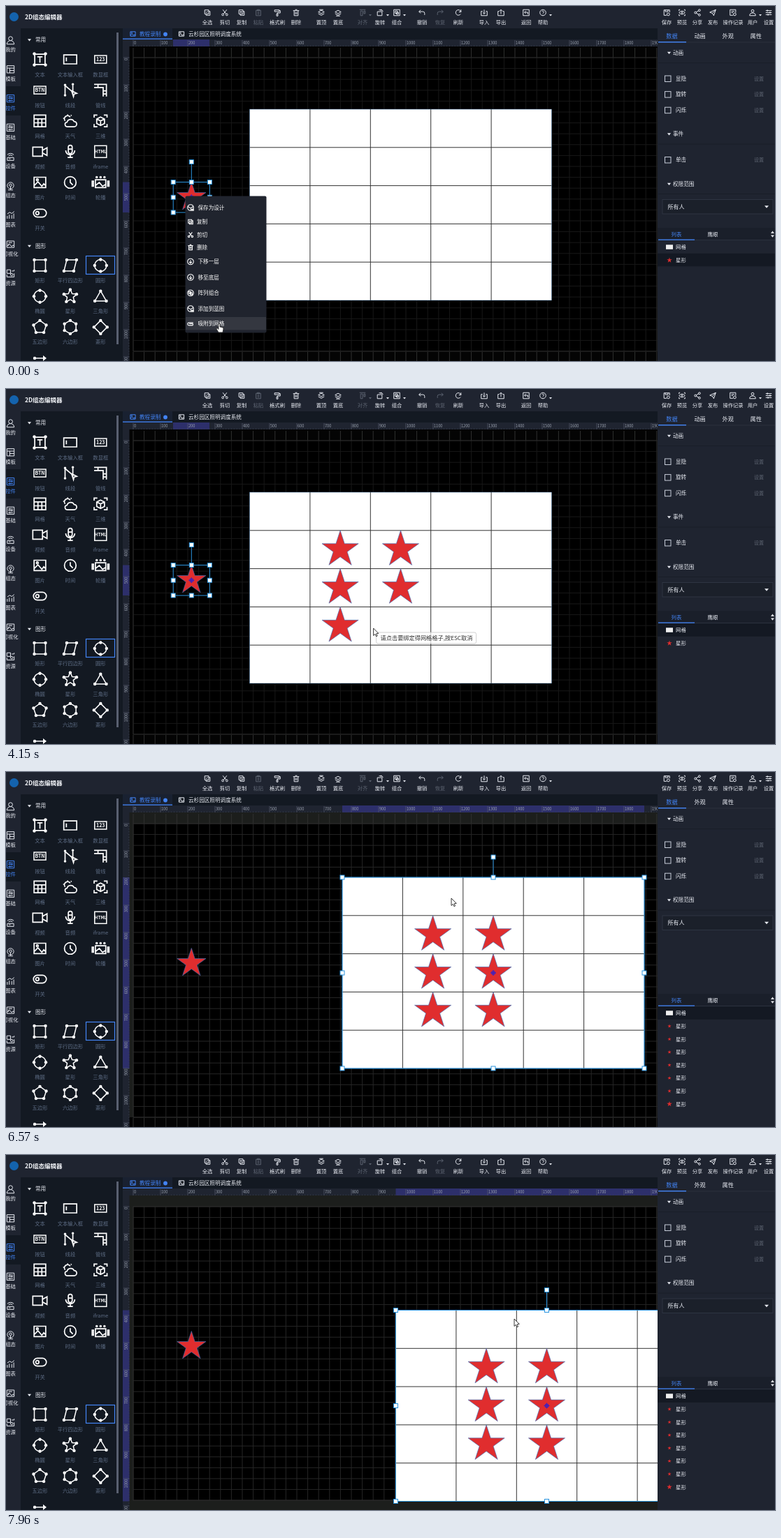
Recreate the animation shown at these times as an HTML page with a canvas. Size 1100 by 509 pixels, loop 8 s.

```html
<!DOCTYPE html>
<html lang="zh-CN">
<head>
<meta charset="utf-8">
<title>2D组态编辑器</title>
<style>
html, body { margin: 0; width: 100%; height: 100%; overflow: hidden; background: #131922; }
canvas { display: block; width: 1100px; height: 509px; }
</style>
</head>
<body>
<canvas id="stage" width="1100" height="509"></canvas>
<script>
const c = document.getElementById('stage').getContext('2d');
const LOOP = 8000;
const FONT = '"Noto Sans CJK SC", "Noto Sans CJK", "Noto Sans", sans-serif';
const BAR = '#1f2430', DARK = '#131922', INK = '#e8ebf2', DIM = '#5c6370', BLUE = '#4384f5', RED = '#e02d2e', SEL = '#2d2f6b';

// Bursts of screen updates: first, last, count
const BURSTS = [[400, 1370, 8], [1490, 2480, 8], [2600, 3600, 8], [3750, 4290, 5],
  [4790, 5090, 3], [5520, 6450, 8], [6570, 7540, 8], [7690, 7960, 3]];
// Pointer path: time, x, y
const POINTER = [[0, 305, 456], [400, 308, 452], [680, 345, 405], [1090, 440, 282], [1370, 478, 238], [1630, 486, 231],
  [1770, 500, 232], [2060, 566, 235], [2340, 574, 240], [2600, 570, 282], [2740, 562, 290], [3030, 491, 290],
  [3310, 486, 325], [3600, 486, 343], [3890, 510, 344], [4290, 558, 341], [4940, 556, 340], [5090, 557, 341],
  [5520, 562, 320], [5650, 548, 285], [5790, 512, 205], [5920, 497, 181], [6570, 637, 181], [6850, 675, 182],
  [7130, 622, 182], [7400, 525, 180], [7540, 512, 195], [7690, 560, 250], [7820, 650, 265], [7960, 727, 235]];
// Table position: time, x, y
const TABLE = [[0, 348.5, 148], [5920, 348.5, 148], [6050, 365, 151], [6570, 481, 151], [6850, 526, 151], [7130, 484, 151],
  [7400, 396.5, 151], [7540, 376, 160], [7690, 400, 205], [7820, 480, 236], [7960, 557.5, 222.5]];
// Bound stars: time, column, row
const BOUND = [[1490, 1, 1], [2200, 2, 1], [2740, 2, 2], [3030, 1, 2], [3600, 1, 3], [4290, 2, 3]];
const CW = 86.4, CH = 54.8;

function held(t) {
  let now = 0;
  for (const [a, b, n] of BURSTS)
    for (let i = 0; i < n; i++) {
      const s = Math.round((a + (b - a) * i / (n - 1)) / 10) * 10;
      if (t >= s) now = s;
    }
  return now;
}
function along(path, t) {
  let i = path.findIndex(k => k[0] > t);
  if (i < 0) return path[path.length - 1].slice(1);
  const p = path[i - 1], q = path[i], f = (t - p[0]) / (q[0] - p[0]);
  return [p[1] + (q[1] - p[1]) * f, p[2] + (q[2] - p[2]) * f];
}

function box(x, y, w, h, fill) { c.fillStyle = fill; c.fillRect(x, y, w, h); }
function frame(x, y, w, h, color, lw = 1) { c.strokeStyle = color; c.lineWidth = lw; c.strokeRect(x, y, w, h); }
function line(x1, y1, x2, y2, color, lw = 1) {
  c.strokeStyle = color; c.lineWidth = lw;
  c.beginPath(); c.moveTo(x1, y1); c.lineTo(x2, y2); c.stroke();
}
function text(s, x, y, size = 7.4, color = INK, align = 'left', weight = 400) {
  c.font = `${weight} ${size}px ${FONT}`;
  c.textAlign = align; c.textBaseline = 'middle'; c.fillStyle = color;
  c.fillText(s, x, y);
}
const mid = (s, x, y, size, color, weight) => text(s, x, y, size, color, 'center', weight);
function poly(pts) {
  c.beginPath();
  pts.forEach(p => c.lineTo(p[0], p[1]));
  c.closePath();
}
function ring(n, r, x, y, inner) {
  const m = inner ? n * 2 : n;
  return Array.from({ length: m }, (_, i) => {
    const a = i / m * Math.PI * 2 - Math.PI / 2, k = inner && i % 2 ? inner : r;
    return [x + k * Math.cos(a), y + k * Math.sin(a)];
  });
}
function star(x, y, r, outline) {
  poly(ring(5, r, x, y, r * 0.382));
  c.fillStyle = RED; c.fill();
  if (outline) { c.strokeStyle = '#3f6fb5'; c.lineWidth = 0.65; c.stroke(); }
}
function arrow(x, y, color = INK, s = 2.6) {
  poly([[x - s, y - s / 2], [x + s, y - s / 2], [x, y + s / 2 + 0.6]]);
  c.fillStyle = color; c.fill();
}

const disc = (r, x = 0, y = 0) => `M${x - r} ${y}a${r} ${r} 0 1 0 ${2 * r} 0a${r} ${r} 0 1 0 ${-2 * r} 0`;
const COPY = 'M-8-8H4V4H-8ZM-4 4V8H8V-4H4', LAYER = 'M0-7L9-2 0 3-9-2ZM-9 3L0 8 9 3', TRAY = 'M-5-4H-9V9H9V-4H5M0-9V4', PIC = 'M-9-8H9V8H-9ZM-9 5L-3-1 3 6 6 2 9 5';
const ICON = {
  全选: COPY + 'M-5-2l2 2 4-4', 复制: COPY + 'M-5-2H1M-2-5V1',
  剪切: 'M-6-9L4 4M6-9L-4 4' + disc(3, -6, 6) + disc(3, 6, 6),
  粘贴: 'M-7-7H7V9H-7ZM-3-9H3V-5H-3ZM-3 0H3M-3 4H3', 格式刷: 'M-8-8H6V-3H-8ZM6-6H9V1H0V4M-2 4H2V10H-2Z',
  删除: 'M-9-6H9M-6-6V9H6V-6M-3-9H3M-2-2V5M2-2V5', 置顶: LAYER + 'M-6-9H6', 置底: LAYER + 'M-6 10H6',
  对齐: 'M-9-9H9M-6-5H0V9H-6ZM4-5H8V3H4Z', 旋转: 'M-8-3H6V9H-8ZM-3-8H6L9-3M3-10V-6', 组合: 'M-9-9H9V9H-9ZM-5-5H2V2H-5ZM-1-1H5V5H-1Z',
  撤销: 'M-4-8L-9-3-4 2M-9-3H3a5 5 0 0 1 5 5V7', 恢复: 'M4-8L9-3 4 2M9-3H-3a5 5 0 0 0-5 5V7', 刷新: 'M8-2A8 8 0 1 0 7 4M8-9V-2H2',
  导入: TRAY + 'M-4 0L0 4 4 0', 导出: TRAY + 'M-4-5L0-9 4-5', 返回: 'M-9-9H9V9H-9ZM-1-5L-5-1-1 3M-5-1H5V5',
  帮助: disc(9) + 'M-3-3a3 3 0 1 1 3 4V2M0 5V6', 保存: 'M9-1V-8H-8V8H0M-4-8V-3H4V-8' + disc(4, 5, 5),
  预览: 'M-6-9H-9V-5M6-9H9V-5M-9 5V9H-6M9 5V9H6M-9 0Q0-10 9 0Q0 10-9 0' + disc(2),
  分享: 'M-4-1L4-6M-4 1L4 6' + disc(3, -6) + disc(3, 6, -7) + disc(3, 6, 7), 发布: 'M-9-1L9-9 3 9-1 2ZM-1 2L9-9',
  操作记录: 'M-9-9H8V0M-9-9V8H0M-5-4H4M-5 0H0' + disc(4, 5, 5), 用户: disc(4, 0, -5) + 'M-9 9a9 8 0 0 1 18 0Z',
  设置: 'M-9-6H9M-9 0H9M-9 6H9M-4-9V-3M4-3V3M-2 3V9',
  我的: disc(5, 0, -4) + 'M-9 10a9 9 0 0 1 18 0Z', 模板: 'M-9-9H9V9H-9ZM-9-3H9M-2-3V9M-2 3H9',
  控件: 'M-9-9H9V9H-9ZM-6-4H6M-6 0H6M-6 5H6M-2-6V-2M3-2V2M-2 3V7',
  设备: 'M-8 2H8V9H-8ZM-4 5H0M-5-2a7 7 0 0 1 10 0M-8-5a11 11 0 0 1 16 0', 组态: disc(8, 0, -1) + disc(3, 0, -2) + 'M-6 10H6M0 2V9',
  图表: 'M-8 9V2M-3 9V-1M3 9V0M8 9V-4M-8-3L-2-7 3-4 9-9', 可视化: PIC + 'M-5-4H4M-5-1V4', 资源: 'M-9-9H0V0H-9ZM-9 3V9H9V0M3-6H9V-9' + disc(3, 3, 3),
  文本: 'M-8-8H8V8H-8ZM-4-4H4M0-4V5', 文本输入框: 'M-10-7H10V7H-10ZM-6-3V3',
  线段: 'M-8 8V-7L4 3V-9M2 1L10 5 6 6 5 10Z' + disc(1, -8, -8) + disc(1, -8, 8) + disc(1, 4, -9), 管线: 'M-10-9H9V10M-10-4H4V10M-4-9V-4M4 1H9M4 6H9',
  网格: 'M-9-9H9V9H-9ZM-9-3H9M-9 3H9M-3-3V9M3-3V9', 天气: 'M-4 9H6a4 4 0 0 0 0-8a6 6 0 0 0-11 1a3.5 3.5 0 0 0 1 7ZM-8 0a5 5 0 0 1 8-6M-11-4H-9M-4-10V-8M2-9L1-8',
  三维: 'M0-6L6-3V4L0 7-6 4V-3ZM-6-3L0 0 6-3M0 0V7M-10-5V-9H-5M5-9H10V-5M10 5V9H5M-5 9H-10V5',
  视频: 'M-11-7H4V7H-11ZM4-2L11-6V6L4 2', 音频: 'M-3-7a3 3 0 0 1 6 0V0a3 3 0 0 1-6 0ZM-7-2a7 7 0 0 0 14 0M0 6V9M-4 9H4M-3-4H3',
  图片: PIC + disc(1.5, -4, -4), 时间: disc(9) + 'M0-5V0L4 4', 轮播: 'M-8-4H8V8H-8ZM-8 5L-2 0 3 6 8 3M-13-2V6H-11V-2ZM13-2V6H11V-2Z' + disc(1, -6, -8) + disc(1, 0, -8) + disc(1, 6, -8),
  开关: 'M-4-6H4a6 6 0 0 1 0 12H-4a6 6 0 0 1 0-12Z' + disc(2.5, -4),
  下: disc(9) + 'M0-5V5M-4 1L0 5 4 1', 网: disc(9) + 'M-5-4H1V2H-5ZM-1-1H5V5H-1Z', 设计: disc(9) + 'M-8-3L0 2 8-3M1 5H9V9H1Z',
  夹: 'M8-3H-5a4 4 0 0 0 0 8H6a3 3 0 0 0 0-5H-4', 颜料: 'M-6-2L0-9 8 0 1 7ZM-4-4H5M-9 10H9', 缩放: 'M-9-4V-9H-4M4-9H9V-4M9 4V9H4M-4 9H-9V4M-4-4H4V4H-4Z',
  拉伸: 'M-9-9H9V9H-9ZM-5 5L5-5M1-5H5V-1M-5 1V5H-1'
};
ICON.基础 = ICON.控件;
const cache = {};
function icon(name, x, y, size, color = INK, lw = 1) {
  const p = cache[name] || (cache[name] = new Path2D(ICON[name]));
  c.save();
  c.translate(x, y); c.scale(size / 20, size / 20);
  c.strokeStyle = color; c.lineWidth = lw * 20 / size; c.stroke(p);
  c.restore();
}

const TOOLS = [['全选', 288], ['剪切', 313], ['复制', 337], ['粘贴', 361], ['格式刷', 388], ['删除', 415], ['置顶', 451], ['置底', 475],
  ['对齐', 510], ['旋转', 535], ['组合', 559], ['撤销', 595], ['恢复', 621], ['刷新', 647], ['导入', 684], ['导出', 708], ['返回', 744],
  ['帮助', 768], ['保存', 945], ['预览', 967], ['分享', 989], ['发布', 1011], ['操作记录', 1040], ['用户', 1068], ['设置', 1091]];
function header(mode) {
  box(0, 0, 1100, 32, BAR);
  c.beginPath(); c.arc(11.5, 15.5, 6.5, 0, 7); c.fillStyle = '#1463ad'; c.fill();
  text('2D组态编辑器', 27, 15.5, 8.5, '#f2f4f8', 'left', 700);
  TOOLS.forEach(([name, x], i) => {
    const off = ['粘贴', '对齐', '恢复'].includes(name) || (mode === 'page' && i > 0 && i < 11);
    const color = off ? DIM : INK;
    icon(name, x, 9.5, 9.5, color);
    mid(name, x, 23.5, 7.3, color);
    if (['对齐', '旋转', '组合', '帮助', '用户'].includes(name)) arrow(x + 11, 13, color, 2);
  });
}

const RAIL = ['我的', '模板', '控件', '基础', '设备', '组态', '图表', '可视化', '资源'];
const WIDGETS = ['文本', '文本输入框', '数显框', '按钮', '线段', '管线', '网格', '天气', '三维', '视频', '音频', 'iframe', '图片', '时间', '轮播', '开关'];
const SHAPES = ['矩形', '平行四边形', '圆形', '椭圆', '星形', '三角形', '五边形', '六边形', '菱形'];
const BADGE = { 数显框: '123', 按钮: 'BTN', iframe: 'HTML' };
const colX = i => 48.5 + 43.4 * (i % 3);
function nodes(pts) {
  c.strokeStyle = '#fff'; c.lineWidth = 1.5;
  poly(pts); c.stroke();
  dots(pts);
}
function dots(pts) {
  c.fillStyle = '#fff';
  for (const [x, y] of pts) { c.beginPath(); c.arc(x, y, 2.2, 0, 7); c.fill(); }
}
function shape(name, x, y) {
  const sides = { 三角形: 3, 五边形: 5, 六边形: 6, 菱形: 4 }[name];
  if (name === '矩形') nodes([[x - 8, y - 8], [x + 8, y - 8], [x + 8, y + 8], [x - 8, y + 8]]);
  else if (name === '平行四边形') nodes([[x - 5, y - 8], [x + 9, y - 8], [x + 5, y + 8], [x - 9, y + 8]]);
  else if (sides) nodes(ring(sides, 9.5, x, y + (sides === 3 ? 2 : 0)));
  else if (name === '星形') {
    poly(ring(5, 10, x, y, 4.6)); c.strokeStyle = '#fff'; c.lineWidth = 1.5; c.stroke();
    dots(ring(5, 9.5, x, y));
  } else {
    c.beginPath(); c.arc(x, y, 8.5, 0, 7); c.strokeStyle = '#fff'; c.lineWidth = 1.5; c.stroke();
    dots(ring(4, 8.5, x, y));
  }
}
function leftSide() {
  box(0, 32, 21, 477, BAR);
  box(21, 32, 146, 477, DARK);
  box(0, 115, 21, 42, DARK);
  RAIL.forEach((name, i) => {
    const y = 62.5 + i * 41.8, color = name === '控件' ? BLUE : INK;
    icon(name, 6.5, y - 13.5, 11.5, color);
    mid(name, 6.5, y, 7.3, color);
  });
  for (const [name, y] of [['常用', 48.5], ['图形', 344]]) {
    arrow(33.5, y); text(name, 42, y, 7.6);
  }
  WIDGETS.forEach((name, i) => {
    const x = colX(i), y = 76.5 + 44.1 * (i / 3 | 0), tag = BADGE[name];
    if (tag) {
      const h = name === 'iframe' ? 17 : 11;
      frame(x - 8.5, y - h / 2, 17, h, '#fff', 1.5);
      mid(tag, x, y, tag.length > 3 ? 6 : 7, '#fff', 700);
    } else icon(name, x, y, 18.5, '#fff', 1.7);
    if (name === '文本') dots([[x - 8, y - 8], [x + 8, y - 8], [x + 8, y + 8], [x - 8, y + 8]]);
    mid(name, x, y + 21.5, 7.3, '#5d6c84');
  });
  frame(114.5, 358.5, 41, 26, BLUE, 1.2);
  SHAPES.forEach((name, i) => {
    const x = colX(i), y = 372 + 44.2 * (i / 3 | 0);
    shape(name, x, y);
    mid(name, x, y + 21.3, 7.3, '#5d6c84');
  });
  line(41, 505, 54, 505, '#fff', 1.5);
  dots([[41, 505]]);
  poly([[53, 501], [58, 505], [53, 509]]); c.fill();
  box(158, 38, 3, 447, '#596070');
}

function tabs() {
  box(167, 32, 765, 16, DARK);
  box(167, 32, 71, 16, '#192131');
  box(167, 46.5, 71, 1.3, BLUE);
  icon('图片', 181.5, 40, 8, BLUE);
  text('教程录制', 191, 40, 7.6, BLUE);
  c.beginPath(); c.arc(228, 40.5, 2.9, 0, 7); c.fillStyle = BLUE; c.fill();
  icon('图片', 251, 40, 8);
  text('云杉园区照明调度系统', 261, 40, 7.6);
}

function rulers(area) {
  box(167, 48, 765, 10, BAR);
  box(167, 48, 9.5, 461, BAR);
  if (area) {
    const [x, y, w, h] = area;
    box(x, 48, Math.min(w, 932 - x), 10, SEL);
    box(167, y, 9.5, h, SEL);
  }
  for (let i = 0; i <= 192; i++) {
    const x = 182 + i * 3.9, y = 74 + i * 3.9, big = i % 10 === 0;
    if (x < 932) line(x, big ? 49 : 56.5, x, 58, big ? '#596070' : '#3b4250', 0.7);
    if (y < 509) line(big ? 168 : 175, y, 176.5, y, big ? '#596070' : '#3b4250', 0.7);
    if (!big) continue;
    text(i * 10, x + 1, 52.5, 5.6, '#9ba2b0');
    c.save();
    c.translate(171.5, y + 1); c.rotate(-Math.PI / 2);
    text(i * 10, 0, 0, 5.6, '#9ba2b0', 'right');
    c.restore();
  }
}
function backdrop(t) {
  box(167, 48, 765, 461, '#040404');
  if (t >= 5650) { box(176, 58, 756, 16, '#1c1e1c'); box(176, 58, 6, 437, '#1c1e1c'); }
  const clean = t >= 6700;
  if (clean) box(176, 495, 756, 14, '#1c1e1c');
  box(182, 74, 749, 421, '#000');
  const ink = t >= 5650 ? '#262626' : '#181818';
  for (let i = 0; i <= 48; i++) {
    const x = 182 + i * 15.6, y = 74 + i * 15.6;
    line(x, 74, x, 495, ink);
    if (y < 496) line(182, y, 932, y, ink);
    if (!clean) { line(x, 60, x, 74, '#303130'); line(x, 496, x, 509, '#303130'); }
  }
  frame(182, 74, 749, 421, '#2a2b2a');
}
function table(x, y, t) {
  box(x, y, CW * 5, CH * 5, '#fff');
  for (let i = 1; i < 5; i++) {
    line(x + CW * i, y, x + CW * i, y + CH * 5, '#333');
    line(x, y + CH * i, x + CW * 5, y + CH * i, '#333');
  }
  frame(x, y, CW * 5, CH * 5, '#3d6f9e', 0.5);
  for (const [when, col, row] of BOUND)
    if (t >= when) star(x + CW * (col + 0.5), y + CH * (row + 0.5), CH / 2, true);
}
function selection(x, y, w, h, rise) {
  const cx = x + w / 2, cy = y + h / 2;
  frame(x, y, w, h, '#2b95e0');
  line(cx, y, cx, y - rise, '#2b95e0');
  const spots = [[cx, y - rise]];
  for (const i of [0, 1, 2]) for (const j of [0, 1, 2])
    if (i !== 1 || j !== 1) spots.push([x + w * i / 2, y + h * j / 2]);
  for (const [a, b] of spots) { box(a - 3, b - 3, 6, 6, '#fff'); frame(a - 3, b - 3, 6, 6, '#2b95e0'); }
  line(cx - 4, cy, cx + 4, cy, '#2a20d0', 1.2);
  line(cx, cy - 4, cx, cy + 4, '#2a20d0', 1.2);
  frame(cx - 2, cy - 2, 4, 4, '#2a20d0', 0.9);
}

const MENU = [['保存为设计', 289, '设计'], ['复制', 309.5, '复制'], ['剪切', 328, '剪切'], ['删除', 346, '删除'], ['下移一层', 366.5, '下'],
  ['移至底层', 389, '下'], ['阵列组合', 411.5, '网'], ['添加到蓝图', 434, '设计'], ['吸附到网格', 455.5, '夹']];
function menu() {
  c.beginPath(); c.roundRect(256.5, 272.5, 116, 196, 2); c.fillStyle = '#20242e'; c.fill();
  box(257, 446, 115, 18.5, '#343740');
  for (const [name, y, sign] of MENU) {
    icon(sign, 264, y, name.length > 2 ? 9.5 : 8, '#fff', 1.1);
    text(name, name.length > 2 ? 274.5 : 273, y, 7.6, '#fff', 'left', 500);
  }
}
function tooltip(x, y) {
  c.beginPath(); c.roundRect(x, y, 143, 16, 2.5);
  c.fillStyle = 'rgba(255,255,255,.72)'; c.fill();
  c.strokeStyle = '#c4c4c4'; c.lineWidth = 0.8; c.stroke();
  text('请点击要绑定得网格格子,按ESC取消', x + 6, y + 8, 8.2, '#333');
}
function pointer(x, y) {
  poly([[0, 0], [0, 10.5], [2.4, 8.4], [4, 11.8], [5.6, 11], [4.1, 7.8], [7.2, 7.4]].map(p => [x + p[0], y + p[1]]));
  c.fillStyle = '#fff'; c.fill();
  c.strokeStyle = '#222'; c.lineWidth = 0.9; c.stroke();
}
function hand(x, y) {
  c.save();
  c.translate(x, y);
  const p = new Path2D('M-1 0Q0-1.5 1 0V4L5 5Q6 5.5 6 7L5 12H-1L-4 7Q-4 5.5-2.5 6L-1 7.5Z');
  c.fillStyle = '#fff'; c.fill(p);
  c.strokeStyle = '#222'; c.lineWidth = 0.8; c.stroke(p);
  c.restore();
}

function section(name, y) {
  arrow(948.5, y); text(name, 954, y, 7.6);
  line(933, y + 14.5, 1100, y + 14.5, '#191e28');
}
function option(name, y) {
  frame(942.5, y - 4, 8.5, 8.5, '#c6ccd8');
  text(name, 958, y, 7.6);
  text('设置', 1070, y, 7, DIM);
}
function dropdown(label, x, y, w, h) {
  box(x, y, w, h, '#1b202a');
  frame(x, y, w, h, '#333947', 0.8);
  text(label, x + 7.5, y + h / 2, 8);
  arrow(1088, y + h / 2, INK, 3);
}
function rightTabs(names, x, step, w) {
  names.forEach((name, i) => mid(name, x + i * step, 42.5, 8.2, i ? INK : BLUE));
  line(933, 52, 1100, 52, '#2b313d');
  box(933, 51, w, 1.4, BLUE);
}
function rightSide(mode, t) {
  box(932, 32, 168, 477, BAR);
  if (mode === 'page') {
    rightTabs(['画布', '通信'], 958.5, 52.5, 52);
    section('页面属性', 67);
    [['背景颜色', '颜料'], ['背景图片', '图片'], ['删除背景', '删除']].forEach(([name, sign], i) => {
      icon(sign, 962.5 + i * 58.4, 96.5, 14, INK, 1.2);
      mid(name, 962.5 + i * 58.4, 113.5, 7.2);
    });
    section('页面设置', 133.5);
    text('页面大小', 944, 162, 7.2);
    dropdown('1920 * 1080', 1008.5, 151.5, 89, 20.5);
    text('缩放方式', 944, 185, 7.2);
    icon('缩放', 1016.5, 186, 11, BLUE);
    icon('拉伸', 1038.5, 186, 11);
    text('自动生成封面', 944, 206.5, 7.2);
    box(1015, 202, 9, 9, BLUE);
    c.beginPath(); c.moveTo(1017, 206.5); c.lineTo(1019, 208.5); c.lineTo(1022.5, 204.5);
    c.strokeStyle = '#fff'; c.lineWidth = 1.1; c.stroke();
  } else {
    const single = mode === 'star', y = single ? 255 : 183.5;
    rightTabs(single ? ['数据', '动画', '外观', '属性'] : ['数据', '外观', '属性'], 952.5, 40.1, 40);
    section('动画', 67);
    ['显隐', '旋转', '闪烁'].forEach((name, i) => option(name, 104 + i * 22.6));
    if (single) { section('事件', 183.5); option('单击', 220.5); }
    section('权限范围', y);
    dropdown('所有人', 939, y + 22.5, 158, 20.5);
  }
  box(932, 318, 168, 18, '#1a1f2a');
  text('列表', 951.5, 327.5, 7.4, BLUE);
  text('鹰眼', 1003.5, 327.5, 7.4);
  line(933, 335.5, 1100, 335.5, '#2b313d');
  box(933, 334.5, 52, 1.3, BLUE);
  poly([[1094, 326], [1096.5, 322.5], [1099, 326]]); c.fillStyle = INK; c.fill();
  arrow(1096.5, 329.8, INK, 2.5);
  const picked = mode === 'page' ? -1 : t < 1490 ? 1 : 0;
  const count = mode === 'star' ? 2 : 8;
  for (let i = 0; i < count; i++) {
    const y = 345.5 + i * 18.6;
    if (i === picked) box(932, y - 9.3, 168, 18.6, '#141923');
    if (i) star(949, y + 0.3, i === count - 1 ? 4 : 2.8);
    else box(944, y - 3.2, 10, 6.5, '#eee');
    text(i ? '星形' : '网格', 958, y, 7.4);
  }
}

function draw(time) {
  const t = held(time), [px, py] = along(POINTER, t), [gx, gy] = along(TABLE, t);
  const mode = t < 5520 ? 'star' : t < 5920 ? 'page' : 'grid';
  c.save();
  c.beginPath(); c.rect(167, 48, 765, 461); c.clip();
  backdrop(t);
  table(gx, gy, t);
  star(265.3, 274.2, 21.7, true);
  if (mode === 'star') selection(239.2, 252.5, 52.2, 43.5, 29);
  if (mode === 'grid') selection(gx, gy, CW * 5, CH * 5, 29);
  if (mode === 'page') {
    const x = gx + Math.floor((px - gx) / CW) * CW, y = gy + Math.floor((py - gy) / CH) * CH;
    c.setLineDash([2, 1]);
    frame(x - 0.5, y - 1, CW + 1, CH + 1.5, '#37a832', 1.3);
    c.setLineDash([]);
  }
  rulers(mode === 'star' ? [239, 252.5, 52, 43.5] : mode === 'grid' ? [gx, gy, CW * 5, CH * 5] : null);
  if (t < 400) { menu(); hand(px, py); }
  else {
    if (mode === 'star') tooltip(px + 4, py + 6);
    pointer(px, py);
  }
  c.restore();
  header(mode);
  leftSide();
  tabs();
  rightSide(mode, t);
}

const start = performance.now();
function tick() {
  draw((performance.now() - start) % LOOP);
  requestAnimationFrame(tick);
}
tick();
</script>
</body>
</html>
```
